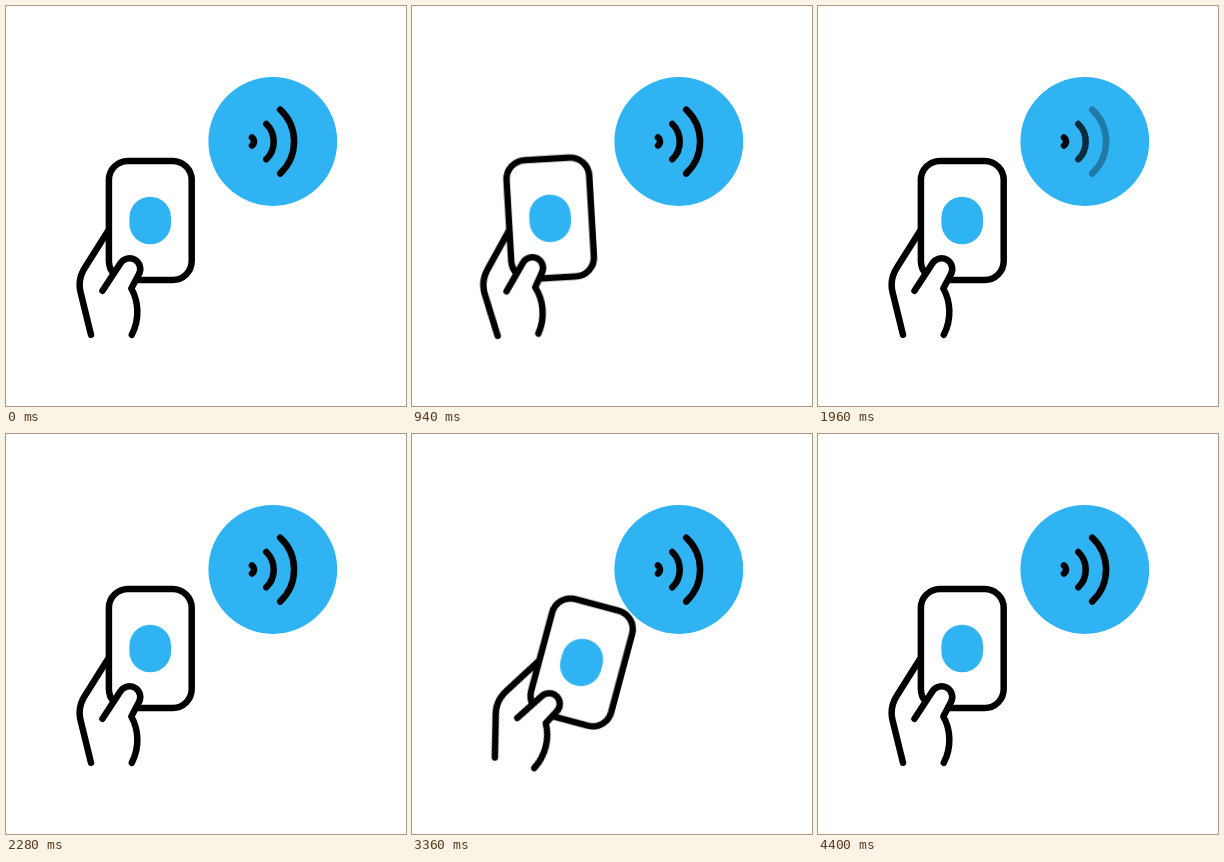
Write an HTML page that moves like this. It is 400x400 px and loops after 4800 ms.

```html
<!DOCTYPE html>
<html lang="en">
<head>
<meta charset="utf-8">
<title>Contactless tap</title>
<style>
  html, body { margin: 0; width: 100%; height: 100%; overflow: hidden; background: #fff; }
  svg { display: block; width: 100%; height: 100%; }

  .line { fill: none; stroke: #000; stroke-width: 6.5; stroke-linecap: round; stroke-linejoin: round; }
  .solid { fill: #fff; }
  .blue { fill: #2fb3f2; }

  .hand, .wave { animation: 4800ms cubic-bezier(.333, 0, .667, 1) infinite; }
  .hand { transform-origin: 104px 318px; animation-name: tap; }
  .near { animation-name: near; }
  .mid { animation-name: mid; }
  .far { animation-name: far; }

  /* pull back, tap, return: played twice per loop */
  @keyframes tap {
    0%, 14.375% { transform: rotate(0deg); }
    18.125% { transform: rotate(-9.3deg); }
    22.917% { transform: rotate(17deg); }
    27.083%, 61.25% { transform: rotate(0deg); }
    64.79% { transform: rotate(-9.3deg); }
    69.167% { transform: rotate(17deg); }
    73.125%, 100% { transform: rotate(0deg); }
  }

  /* waves cut out together, then fade in one after another */
  @keyframes near {
    0%, 30.6% { opacity: 1; }
    30.625% { opacity: 0; }
    42.083%, 76.225% { opacity: 1; }
    76.25% { opacity: 0; }
    87.083%, 100% { opacity: 1; }
  }
  @keyframes mid {
    0%, 30.6% { opacity: 1; }
    30.625%, 33.125% { opacity: 0; }
    44.583%, 76.225% { opacity: 1; }
    76.25%, 78.542% { opacity: 0; }
    89.167%, 100% { opacity: 1; }
  }
  @keyframes far {
    0%, 30.6% { opacity: 1; }
    30.625%, 36.563% { opacity: 0; }
    48.021%, 76.225% { opacity: 1; }
    76.25%, 81.667% { opacity: 0; }
    92.083%, 100% { opacity: 1; }
  }
</style>
</head>
<body>
<svg viewBox="0 0 400 400">
  <circle class="blue" cx="266.8" cy="135.5" r="64.4"/>
  <g class="line">
    <path class="wave near" d="M246 131.5A5 5 0 0 1 246 139.5"/>
    <path class="wave mid" d="M260.3 118A24.7 24.7 0 0 1 260.3 153.3"/>
    <path class="wave far" d="M274.2 103.7A43.6 43.6 0 0 1 274.2 167.5"/>
  </g>
  <g class="hand">
    <path class="line" d="M102 225L79 261.500Q71.500 273 74.500 286L85 328.800"/>
    <rect class="line solid" x="102.900" y="155" width="82.800" height="119" rx="19"/>
    <rect class="blue" x="123.400" y="190.700" width="41.600" height="47.600" rx="20.800"/>
    <path class="line solid" d="M96.500 284.800L114.400 257.400A10.700 10.700 0 0 1 132.700 268.500L125.300 282.500C132.500 295 134 313 125.800 328.800"/>
  </g>
</svg>
</body>
</html>
```
